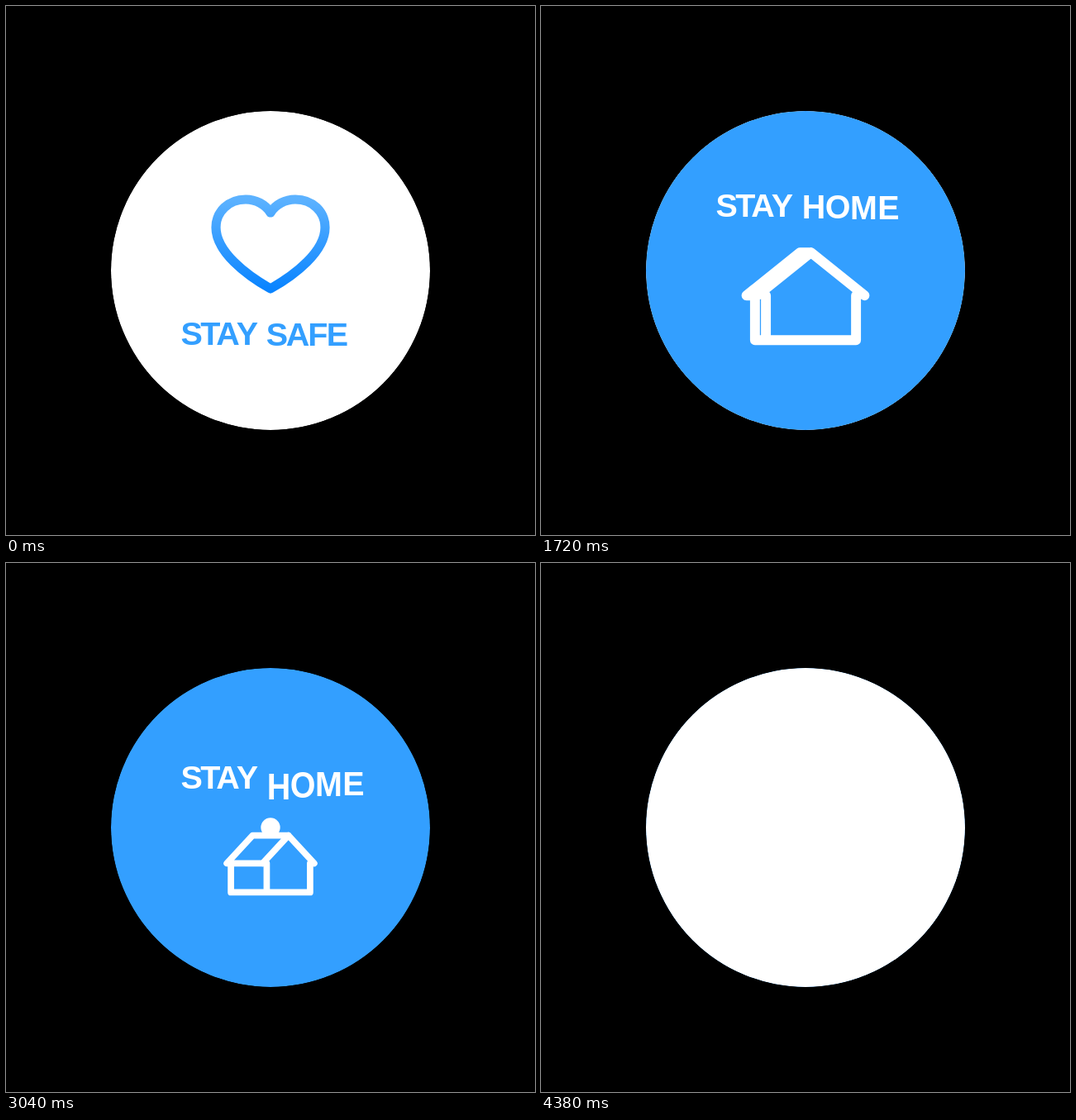
An HTML page for the animation above (4.4 s loop, 640 by 640 pixels).

```html
<!DOCTYPE html>
<html lang="en">
<head>
<meta charset="utf-8">
<title>Stay safe, stay home</title>
<style>
  html, body { margin: 0; width: 100%; height: 100%; overflow: hidden; background: #000; }
  svg { display: block; width: 100vw; height: 100vh; }
  text { font: bold 39.5px "Liberation Sans", Arial, sans-serif; text-anchor: middle; }
  .icon { fill: none; stroke-linecap: round; stroke-linejoin: round; }
</style>
</head>
<body>
<svg id="stage" viewBox="0 0 640 640">
  <defs>
    <linearGradient id="sky" gradientUnits="userSpaceOnUse" x1="0" y1="-96" x2="0" y2="12">
      <stop offset="0" stop-color="#5cb2ff"/>
      <stop offset="1" stop-color="#0a84ff"/>
    </linearGradient>
    <clipPath id="safeClip"><circle cx="320" cy="320"/></clipPath>
    <clipPath id="homeClip"><circle cx="320" cy="320"/></clipPath>
  </defs>
  <g id="safe" clip-path="url(#safeClip)" fill="#339fff">
    <circle cx="320" cy="320" r="193" fill="#fff"/>
    <g class="content">
      <path id="heart" class="icon" stroke="url(#sky)" stroke-width="11.2"
        d="M0-80C6-90 18-96 30-96C51-96 66-81 66-62C66-33 30-5 0 12C-30-5-66-33-66-62C-66-81-51-96-30-96C-18-96-6-90 0-80"/>
    </g>
  </g>
  <g id="home" clip-path="url(#homeClip)" fill="#fff">
    <circle cx="320" cy="320" r="193" fill="#339fff"/>
    <g class="content">
      <path id="house" class="icon" stroke="#fff" stroke-width="12.2"/>
    </g>
  </g>
</svg>
<script>
const LOOP = 4400, HALF = 2200, END = 4370;
const RADIUS = 193, CAP = 27.2, LIFT = 161;
const SAFE_BASE = 411, HOME_BASE = 250.5;
const $ = id => document.getElementById(id);
const stage = $('stage'), heart = $('heart'), house = $('house');

// Symmetric cubic-bezier(.833, 0, .167, 1)
function ease(u) {
  if (u <= 0) return 0;
  if (u >= 1) return 1;
  const a = 0.833;
  let lo = 0, hi = 1;
  for (let i = 0; i < 24; i++) {
    const s = (lo + hi) / 2, q = 1 - s;
    const x = 3 * a * s * q * q + 3 * (1 - a) * s * s * q + s * s * s;
    if (x < u) lo = s; else hi = s;
  }
  return lo * lo * (3 - 2 * lo);
}
const tween = (t, start, length) => ease((t - start) / length);

function addWord(scene, word, centers) {
  const parent = scene.querySelector('.content');
  return [...word].map((ch, i) => {
    const el = document.createElementNS('http://www.w3.org/2000/svg', 'text');
    el.textContent = ch;
    parent.append(el);
    return { el, x: centers[i] };
  });
}

function makeScene(id, word, centers, base) {
  const root = $(id);
  return {
    root, base,
    content: root.querySelector('.content'),
    clip: $(id + 'Clip').firstElementChild,
    stay: addWord(root, 'STAY', [224.7, 247.3, 268.5, 292]),
    word: addWord(root, word, centers)
  };
}
const safe = makeScene('safe', 'SAFE', [328, 353, 377.3, 401], SAFE_BASE);
const home = makeScene('home', 'HOME', [330, 359, 390.5, 420.5], HOME_BASE);

function placeLetter({ el, x }, base, top, bottom) {
  const sy = (CAP + bottom - top) / CAP;
  el.setAttribute('transform', `translate(${x} ${base + bottom}) scale(1 ${sy})`);
}

// Leading edge of each letter runs ahead of its trailing edge
function moveWord(scene, t, up, offset) {
  scene.word.forEach((letter, i) => {
    const lead = offset(tween(t, -12 + 12 * i, HALF));
    const trail = offset(tween(t, 15 + 7 * i, HALF));
    placeLetter(letter, scene.base, up ? lead : trail, up ? trail : lead);
  });
}

function moveStay(scene, dy) {
  for (const letter of scene.stay) placeLetter(letter, scene.base - 0.5, dy, dy);
}

function placeIcon(el, y, k) {
  el.setAttribute('transform', `translate(320 ${y}) scale(${k})`);
  el.style.display = k > 0.001 ? '' : 'none';
}

// Box house turned about its vertical axis, seen flat
function housePath(angle) {
  const side = angle < 0 ? -1 : 1, c = Math.cos(angle);
  const front = 50.5 * Math.sin(angle);
  const wall = 56.2 * c, eave = 66.8 * c;
  const ridge = -38.2, low = 15, floor = 70.3;
  const backEave = -front - side * eave, backWall = -front - side * wall;
  const nearEave = front - side * eave, nearWall = front - side * wall;
  const farEave = front + side * eave, farWall = front + side * wall;
  return `M${nearEave} ${low}L${front} ${ridge}L${farEave} ${low}` +
    `M${front} ${ridge}H${-front}L${backEave} ${low}H${nearEave}` +
    `M${backWall} ${low}V${floor}H${farWall}V${low}` +
    `M${nearWall} ${low}V${floor}`;
}

function draw(time) {
  const t = time % HALF, out = time < HALF;
  const p = tween(t, 0, HALF);
  const shift = LIFT * (out ? p : 1 - p);
  const [back, front] = out ? [safe, home] : [home, safe];

  if (stage.lastElementChild !== front.root) stage.append(front.root);
  back.clip.setAttribute('r', RADIUS);
  front.clip.setAttribute('r', RADIUS * (out ? tween(t, 698, 1020) : tween(t, 504, 1190)));

  moveStay(safe, -shift);
  moveStay(home, LIFT - shift);
  if (out) {
    moveWord(safe, t, true, q => -230 * q);
    moveWord(home, t, true, q => 200 * (1 - q));
  } else {
    moveWord(home, t, false, q => 230 * q);
    moveWord(safe, t, false, q => -180 * (1 - q));
  }

  const shrink = 1 - tween(t, 0, 1770);
  const houseScale = out ? tween(t, 400, 1620) : shrink;
  placeIcon(heart, 330 - shift, out ? shrink : tween(t, 430, 1770));
  placeIcon(house, 330.5 + LIFT - shift, houseScale);
  house.setAttribute('d', housePath(43 * Math.PI / 180 * Math.tanh((time - 1625) / 532)));
  house.style.opacity = out ? Math.min(1, houseScale * 1.45) : 1;

  safe.content.style.display = time < END ? '' : 'none';
}

const start = performance.now();
function tick() {
  draw((performance.now() - start) % LOOP);
  requestAnimationFrame(tick);
}
tick();
</script>
</body>
</html>
```
